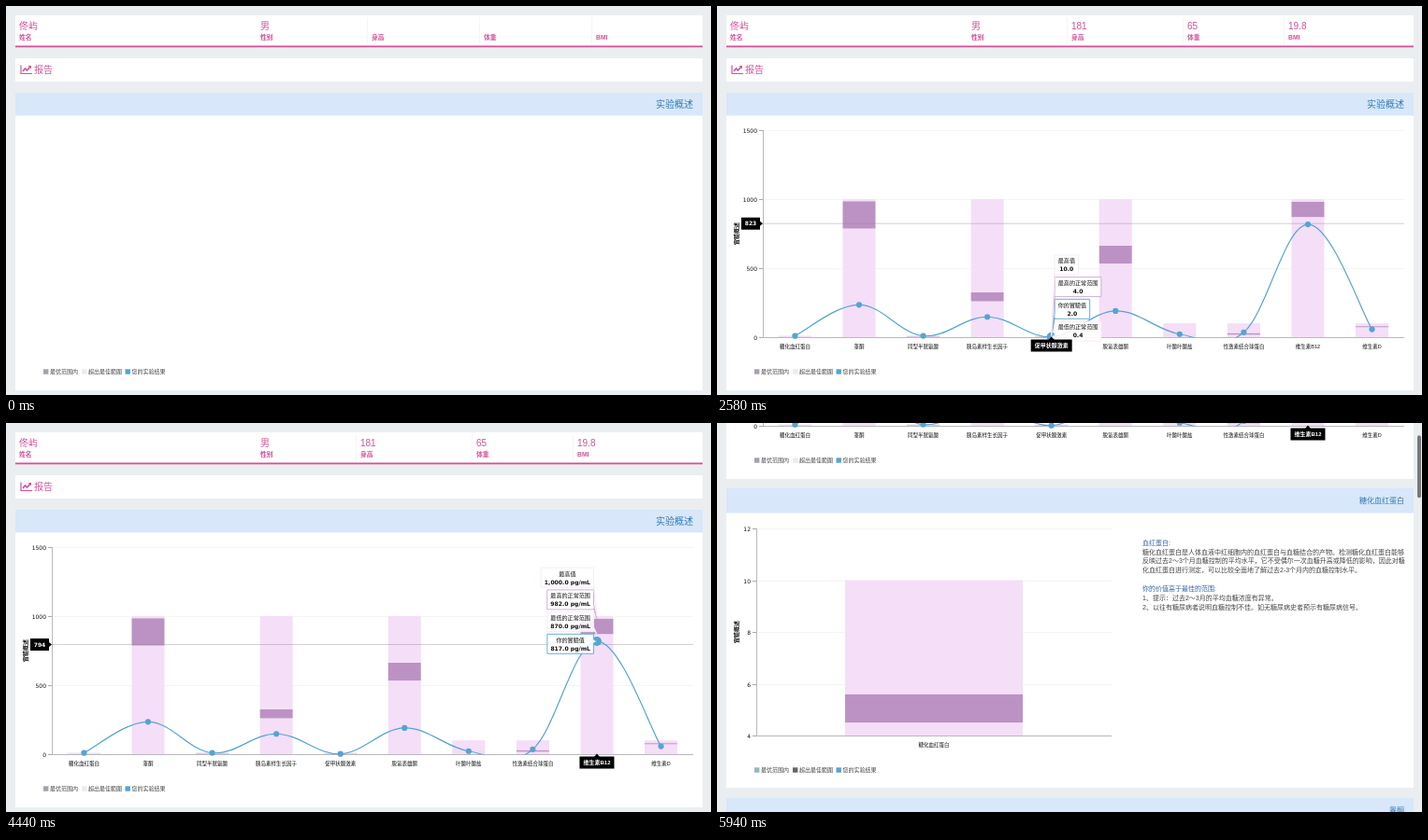
An HTML page with a canvas for the animation above (6000 ms loop, 754x417 px).

```html
<!DOCTYPE html>
<html lang="zh">
<head>
<meta charset="utf-8">
<style>
html, body { margin: 0; width: 100%; height: 100%; overflow: hidden; background: #ebeef0; }
canvas { display: block; }
</style>
</head>
<body>
<canvas id="stage" width="754" height="417"></canvas>
<script>
const ctx = document.getElementById('stage').getContext('2d');
const LOOP = 6000, LOADED = 60, LINE_SHOWN = 2060, CURSOR_IN = 1500, SECOND_START = 4650;
const PINK = '#f5def7', MAUVE = '#bc92c4', BLUE = '#53a5d2', ROSE = '#d4519a';
const SANS = '"Liberation Sans", "Noto Sans CJK SC", "Noto Sans CJK", sans-serif';
const WIDE = '"DejaVu Sans", "Noto Sans CJK SC", "Noto Sans CJK", sans-serif';

// name, normal low, normal high, maximum, measured, unit, balloon shift
const tests = [
  ['糖化血红蛋白', 4.5, 5.6, 10, 9, '%'],
  ['睾酮', 787, 985, 1000, 234, 'ng/dl'],
  ['同型半胱氨酸', 4, 8, 10, 9.4, ''],
  ['胰岛素样生长因子', 260, 325, 1000, 147, 'ng/mL'],
  ['促甲状腺激素', 0.4, 4, 10, 2, ''],
  ['脱氢表雄酮', 533, 663, 1000, 190, 'ug/dl'],
  ['叶酸叶酸盐', 15, 17, 100, 22, 'ng/mL'],
  ['性激素结合球蛋白', 18, 30, 100, 35, 'nmol/L'],
  ['维生素B12', 870, 982, 1000, 817, 'pg/mL', 2.7],
  ['维生素D', 72, 80, 100, 57, 'ng/mL']
];
const colX = i => 83.4 + 68.57 * i;
const valueY = v => 355 - v * 0.148;
const points = tests.map((d, i) => [colX(i), valueY(d[4])]);

const clamp = (v, lo, hi) => Math.min(hi, Math.max(lo, v));

function track(t, keys) {
  for (let i = 1; i < keys.length; i++) {
    const [t0, a] = keys[i - 1], [t1, b] = keys[i];
    if (t < t1) return a + (b - a) * clamp((t - t0) / (t1 - t0), 0, 1);
  }
  return keys[keys.length - 1][1];
}

function elastic(p) {
  if (p <= 0) return 0;
  return p >= 1 ? 1 : 1 + 2 ** (-10 * p) * Math.sin((p - 0.075) * 2 * Math.PI / 0.3);
}

function rect(x, y, w, h, color) {
  ctx.fillStyle = color;
  ctx.fillRect(x, y, w, h);
}

function path(pts, color, width = 1, fill) {
  ctx.beginPath();
  pts.forEach(p => ctx.lineTo(...p));
  if (fill) {
    ctx.closePath();
    ctx.fillStyle = fill;
    ctx.fill();
  }
  if (color) {
    ctx.strokeStyle = color;
    ctx.lineWidth = width;
    ctx.stroke();
  }
}

function dot(x, y, r, color) {
  ctx.beginPath();
  ctx.arc(x, y, r, 0, 7);
  ctx.fillStyle = color;
  ctx.fill();
}

// y is the vertical middle of the glyphs
function text(s, x, y, size, color, { align = 'left', bold = '', font = SANS } = {}) {
  ctx.font = `${bold} ${size}px ${font}`;
  ctx.textAlign = align;
  ctx.fillStyle = color;
  ctx.fillText(s, x, y + size * 0.37);
}

function header(loaded) {
  rect(10, 10, 735, 33, '#fff');
  rect(10, 42.5, 735, 1.8, ROSE);
  const xs = loaded ? [14, 272, 379, 503, 611] : [14, 272, 391, 511, 631];
  const values = ['佟屿', '男', '181', '65', '19.8'];
  ['姓名', '性别', '身高', '体重', 'BMI'].forEach((label, i) => {
    if (i > 1) rect(xs[i] - 5, 12, 1, 28, '#f5f5f7');
    if (loaded || i < 2) text(values[i], xs[i], 21, 10, ROSE);
    text(label, xs[i], 33.7, 6.8, ROSE, { bold: 'bold' });
  });
  rect(10, 56, 735, 25, '#fff');
  path([[16, 63.5], [16, 72.5], [28, 72.5]], ROSE, 1.2);
  path([[18, 70], [20.5, 67], [22.5, 69], [26, 65]], ROSE, 1.6);
  path([[23.5, 64], [27, 64], [27, 67.5]], null, 0, ROSE);
  text('报告', 30, 68, 10, ROSE);
}

function card(y, headHeight, height, title, size) {
  rect(10, y, 735, height, '#fff');
  rect(10, y, 735, headHeight, '#d8e7f9');
  text(title, 735, y + headHeight / 2, size, '#2f7cb8', { align: 'right', bold: '500' });
}

function legend(y, colors) {
  [['最优范围内', 40], ['超出最佳範圍', 81], ['您的实验结果', 127.5]].forEach(([s, x], i) => {
    rect(x, y - 2.7, 5.4, 5.4, colors[i]);
    text(s, x + 7, y, 6, '#444');
  });
}

function axes(x0, x1, top, bottom, labels) {
  labels.forEach((s, i) => {
    const y = Math.round(bottom + (top - bottom) * i / (labels.length - 1)) + 0.5;
    path([[x0, y], [x1, y]], '#f4f4f4');
    path([[x0 - 4, y], [x0, y]], '#aaa');
    text(s, x0 - 6, y, 6, '#111', { align: 'right', font: WIDE });
  });
  path([[x0 + .5, top], [x0 + .5, bottom + .5], [x1, bottom + .5]], '#b9b9bd');
}

function axisTitle(y) {
  ctx.save();
  ctx.translate(21, y);
  ctx.rotate(-Math.PI / 2);
  text('實驗概述', 0, 0, 6, '#111', { align: 'center', bold: 'bold' });
  ctx.restore();
}

function bar(x, w, levels, toY) {
  levels.slice(1).forEach((v, i) => {
    const y = toY(v);
    rect(x - w / 2, y, w, toY(levels[i]) - y, i === 1 ? MAUVE : PINK);
  });
}

function resultLine(active) {
  ctx.save();
  ctx.beginPath();
  ctx.rect(49, 133, 686, 222.5);
  ctx.clip();
  const at = i => points[clamp(i, 0, points.length - 1)];
  ctx.beginPath();
  ctx.moveTo(...points[0]);
  for (let i = 0; i < points.length - 1; i++) {
    const [a, b, c, d] = [at(i - 1), at(i), at(i + 1), at(i + 2)];
    ctx.bezierCurveTo(b[0] + (c[0] - a[0]) / 5.5, b[1] + (c[1] - a[1]) / 5.5,
      c[0] - (d[0] - b[0]) / 5.5, c[1] - (d[1] - b[1]) / 5.5, ...c);
  }
  ctx.strokeStyle = BLUE;
  ctx.lineWidth = 1.2;
  ctx.stroke();
  ctx.restore();
  points.forEach(([x, y], i) => dot(x, y, i === active ? 5 : 3.1, BLUE));
}

function balloon(x, y, pointY, label, value, color) {
  ctx.font = `bold 6.1px ${WIDE}`;
  const w = Math.max(label.length * 6.1, ctx.measureText(value).width) + 7;
  const side = x > 392 ? -1 : 1;
  const near = x + 3.5 * side, far = near + w * side, mid = (near + far) / 2;
  const top = y - 10.5, bottom = y + 10.5;
  const join = clamp(pointY, top + 3, bottom - 3);
  path([[near, top], [far, top], [far, bottom], [near, bottom], [near, join + 2],
    [x, pointY], [near, join - 2], [near, top]], color, 1, 'rgba(255,255,255,.88)');
  text(label, mid, y - 4.3, 6.1, '#111', { align: 'center' });
  text(value, mid, y + 4.7, 6.1, '#111', { align: 'center', bold: 'bold', font: WIDE });
}

function balloons(i) {
  const [, low, high, max, own, unit, shift = 0] = tests[i];
  let limit = 348.5;
  [['最高值', max, '#f8eaf9'], ['最高的正常范围', high, '#cdb2d2'],
   ['最低的正常范围', low, '#f8eaf9'], ['你的實驗值', own, '#67b0d6']]
    .sort((a, b) => a[1] - b[1])
    .forEach(([label, v, color]) => {
      const py = valueY(v), y = Math.min(py + shift, limit);
      const value = v.toLocaleString('en-US', { minimumFractionDigits: 1 });
      balloon(colX(i), y, py, label, `${value} ${unit}`.trim(), color);
      limit = y - 23.7;
    });
}

function cursorLabels(active, value, y) {
  const x = colX(active), name = tests[active][0];
  const white = { align: 'center', bold: 'bold' };
  rect(26, y - 6.5, 20, 13, '#000');
  path([[46, y - 2.5], [49, y], [46, y + 2.5]], null, 0, '#000');
  text(Math.round(value), 36, y, 6, '#fff', { ...white, font: WIDE });
  ctx.font = `bold 6px ${SANS}`;
  const w = ctx.measureText(name).width + 8;
  rect(x - w / 2, 357.5, w, 13, '#000');
  path([[x - 3, 358], [x, 354.5], [x + 3, 358]], null, 0, '#000');
  text(name, x, 364, 6, '#fff', white);
}

function overview(t) {
  card(93, 24.5, 319, '实验概述', 10);
  legend(392, ['#a99fae', '#eeeaf0', BLUE]);
  if (t < LOADED) return;
  const hovering = t >= CURSOR_IN;
  const active = hovering ? clamp(Math.round(2 + (t - 1800) / 453), 2, 8) : -1;
  const value = track(t, [[1800, 777], [3180, 858], [4440, 794]]);
  const y = valueY(value);

  axes(49, 735, 133, 355, ['0', '500', '1000', '1500']);
  axisTitle(244);
  tests.forEach(([name, low, high, max], i) => {
    const grow = elastic((t - LOADED - i * 100) / 1000);
    bar(colX(i), 35, [0, low, high, max], v => valueY(v * grow));
    text(name, colX(i), 364.5, 5.5, '#111', { align: 'center' });
  });
  path([[49, 355.5], [735, 355.5]], '#b9b9bd');
  if (hovering) path([[49, y], [735, y]], 'rgba(150,130,155,.4)');
  if (t >= LINE_SHOWN) resultLine(active);
  if (hovering) {
    balloons(active);
    cursorLabels(active, value, y);
  }
}

function detail(t) {
  card(422, 26.5, 321, '糖化血红蛋白', 8);
  axes(42, 422, 465, 687, ['4', '6', '8', '10', '12']);
  axisTitle(576);
  const grow = elastic((t - SECOND_START) / 1000);
  bar(232, 190, [4, 4.5, 5.6, 10], v => 687 - (v - 4) * 27.75 * grow);
  path([[42, 687.5], [422, 687.5]], '#b9b9bd');
  text('糖化血红蛋白', 232, 697, 5.5, '#111', { align: 'center' });
  legend(724, ['#8fb9bd', '#666', BLUE]);
  [
    '血红蛋白:',
    '糖化血红蛋白是人体血液中红细胞内的血红蛋白与血糖结合的产物。检测糖化血红蛋白能够',
    '反映过去2～3个月血糖控制的平均水平，它不受偶尔一次血糖升高或降低的影响，因此对糖',
    '化血红蛋白进行测定，可以比较全面地了解过去2-3个月内的血糖控制水平。',
    '',
    '你的价值高于最佳的范围:',
    '1、提示：过去2～3月的平均血糖浓度有异常。',
    '2、以往有糖尿病者说明血糖控制不佳。如无糖尿病史者预示有糖尿病信号。'
  ].forEach((s, i) => text(s, 455, 480 + i * 9.95, 7, s.endsWith(':') ? '#2f62ae' : '#444'));
}

function draw(t) {
  const scroll = track(t, [[4620, 0], [4800, 155], [5400, 260], [5940, 352]]);
  rect(0, 0, 754, 417, '#ebeef0');
  ctx.save();
  ctx.translate(0, -scroll);
  header(t >= LOADED);
  overview(t);
  detail(t);
  card(754, 26, 320, '睾酮', 8);
  ctx.restore();
  if (scroll > 0) {
    ctx.beginPath();
    ctx.roundRect(749, (scroll - 260) / 7, 4, 67, 2);
    ctx.fillStyle = '#77797b';
    ctx.fill();
  }
}

const start = performance.now();
function tick() {
  draw((performance.now() - start) % LOOP);
  requestAnimationFrame(tick);
}
tick();
</script>
</body>
</html>
```
